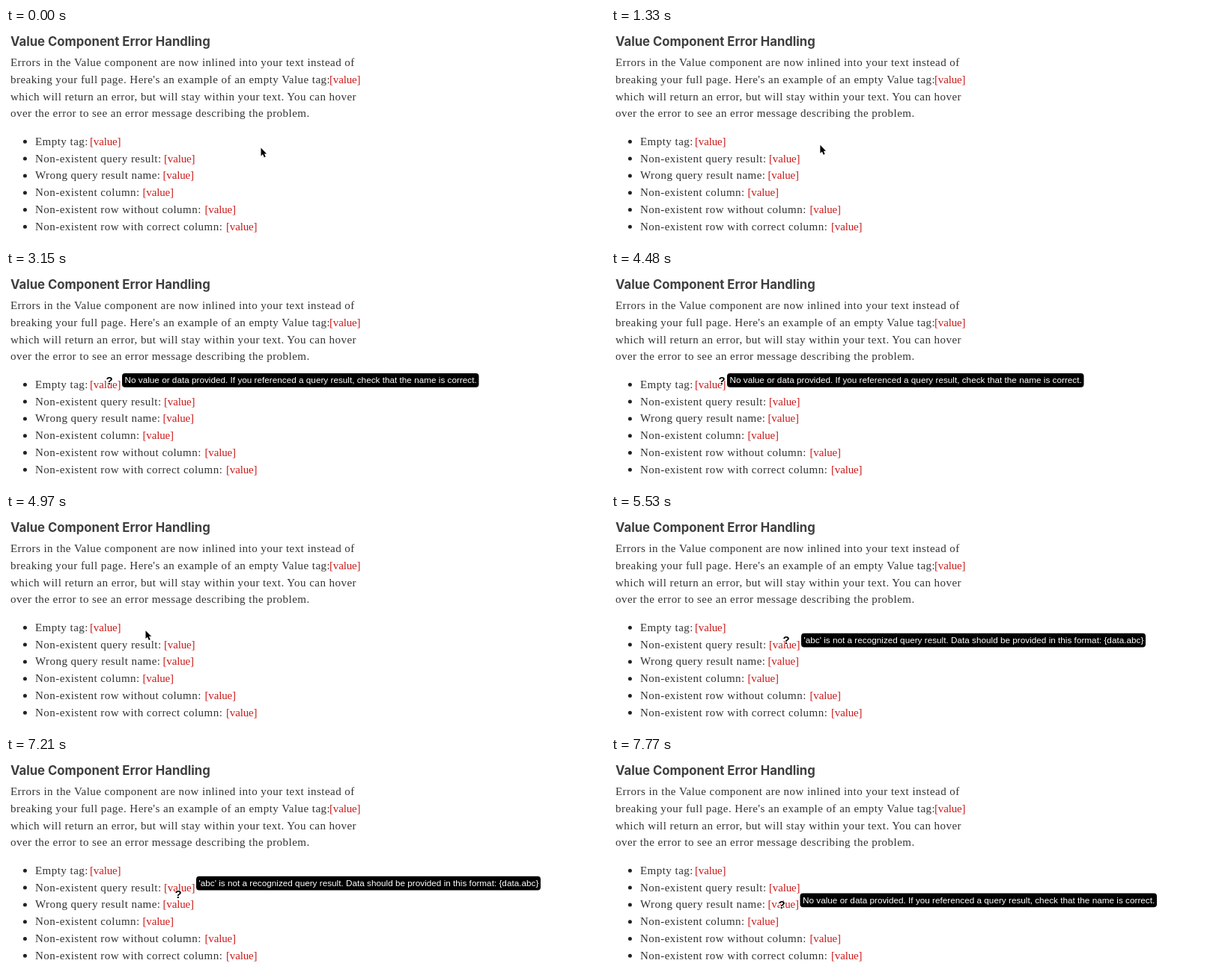
An HTML page that plays this animation: 800 by 288 pixels, repeating every 8000 ms.

```html
<!DOCTYPE html>
<html lang="en">
<head>
<meta charset="utf-8">
<title>Value Component Error Handling</title>
<style>
  html, body { margin: 0; width: 100%; height: 100%; overflow: hidden; background: #fff; }
  svg { display: block; width: 100%; height: 100%; }
  text { font: 15px "Liberation Serif", serif; letter-spacing: .46px; fill: #333; white-space: pre; }
  .heading { font: 700 16.7px Inter, sans-serif; letter-spacing: 0; fill: #3f3f3f; }
  .tag { fill: #cb1b1b; letter-spacing: -.15px; }
  .tip text { font: 11.75px "Liberation Sans", Arial, sans-serif; letter-spacing: 0; fill: #fff; }
  .help { font: bold 15px "Liberation Sans", Arial, sans-serif; letter-spacing: 0; fill: #000;
          stroke: #fff; stroke-width: 1.6px; paint-order: stroke; text-anchor: middle; }
</style>
</head>
<body>
<svg id="stage" viewBox="0 0 800 288">
  <text class="heading" x="6" y="24">Value Component Error Handling</text>
  <g id="content"></g>
  <g id="tips"></g>
  <path id="arrow" d="M.5.5V11.4L3 9.1L4.8 13.3L6.7 12.5L5 8.4H8.1Z"
        stroke="#fff" stroke-width="1.2" paint-order="stroke"/>
  <text id="help" class="help" y="5.4">?</text>
</svg>
<script>
const LOOP = 8000, STEP = 70, LINE = 22.8;
const $ = id => document.getElementById(id);

function add(parent, name, attrs, text = '') {
  const node = document.createElementNS('http://www.w3.org/2000/svg', name);
  for (const key in attrs) node.setAttribute(key, attrs[key]);
  node.textContent = text;
  return parent.appendChild(node);
}
const addTag = (x, y) => add($('content'), 'text', { x, y, class: 'tag' }, '[value]');

[
  'Errors in the Value component are now inlined into your text instead of',
  "breaking your full page. Here's an example of an empty Value tag:",
  'which will return an error, but will stay within your text. You can hover',
  'over the error to see an error message describing the problem.'
].forEach((line, i) => add($('content'), 'text', { x: 6, y: 51 + i * LINE }, line));
addTag(432, 51 + LINE);

// List labels with the x of the tag that follows
[
  ['Empty tag:', 112],
  ['Non-existent query result:', 211],
  ['Wrong query result name:', 209.5],
  ['Non-existent column:', 182.5],
  ['Non-existent row without column:', 265.5],
  ['Non-existent row with correct column:', 294]
].forEach(([label, tagX], i) => {
  const y = 156.7 + i * LINE;
  add($('content'), 'circle', { cx: 25.4, cy: y - 4.4, r: 2.5, fill: '#222' });
  add($('content'), 'text', { x: 39, y }, label);
  addTag(tagX, y);
});

const missing = 'No value or data provided. If you referenced a query result, check that the name is correct.';
const unknown = "'abc' is not a recognized query result. Data should be provided in this format: {data.abc}";
const tips = [
  { from: 2170, to: 4620, x: 155, width: 476.5, text: missing },
  { from: 5110, to: 7350, x: 254, width: 460, text: unknown },
  { from: 7350, to: LOOP, x: 252.5, width: 476.5, text: missing }
];
tips.forEach((tip, i) => {
  const y = 137 + i * LINE;
  tip.node = add($('tips'), 'g', { class: 'tip' });
  add(tip.node, 'rect', { x: tip.x, y, width: tip.width, height: 18.7, rx: 4 });
  add(tip.node, 'text', { x: tip.x + 3.5, y: y + 13.2 }, tip.text);
});

// Pointer path: time, x, y
const path = [
  [0, 340, 160], [1050, 340, 160], [1820, 172, 150], [2030, 158, 145],
  [2380, 137, 147], [3080, 137, 147], [3150, 138, 147], [4130, 138, 147],
  [4480, 148, 147], [4900, 180, 154], [5530, 234, 169], [6300, 234, 169],
  [6510, 233, 171], [6720, 233, 171], [7210, 230, 184], [7490, 228, 194],
  [7770, 228, 198], [LOOP, 228, 198]
];

function pointerAt(time) {
  const next = path.findIndex(point => point[0] > time);
  const [t0, x0, y0] = path[next - 1], [t1, x1, y1] = path[next];
  const k = (time - t0) / (t1 - t0);
  return [x0 + (x1 - x0) * k, y0 + (y1 - y0) * k];
}

const show = (node, visible) => node.setAttribute('visibility', visible ? 'visible' : 'hidden');
let start;

function draw(now) {
  start ??= now;
  const time = Math.floor((now - start) % LOOP / STEP) * STEP;
  let hovering = false;
  for (const { from, to, node } of tips) {
    const active = time >= from && time < to;
    show(node, active);
    hovering ||= active;
  }
  const place = `translate(${pointerAt(time)})`;
  for (const id of ['arrow', 'help']) {
    $(id).setAttribute('transform', place);
    show($(id), hovering === (id === 'help'));
  }
  requestAnimationFrame(draw);
}
requestAnimationFrame(draw);
</script>
</body>
</html>
```
